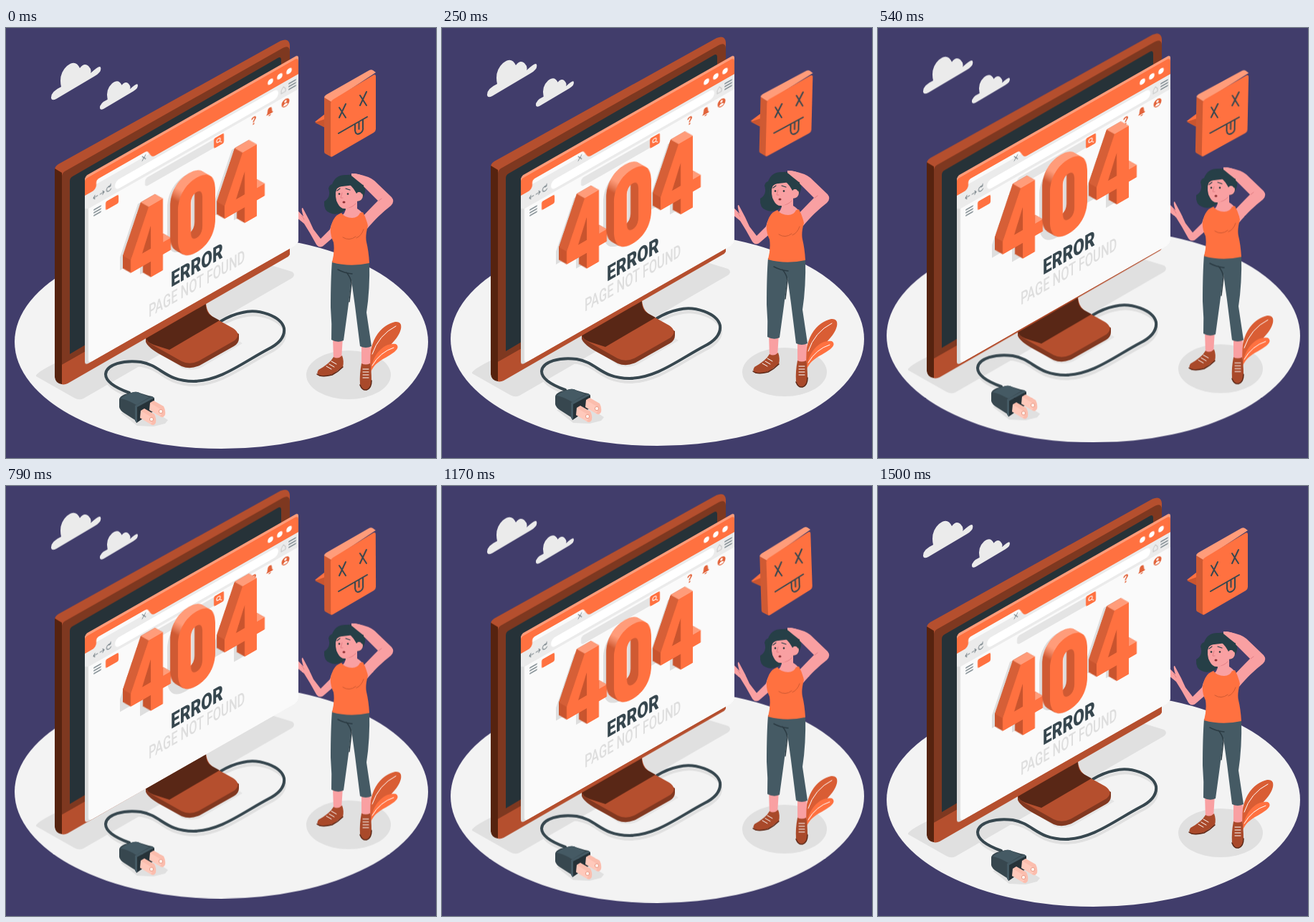
These frames come from a looping animation (600x600 px, 1.54 s). An HTML page:

```html
<!DOCTYPE html>
<html lang="en">
<head>
<meta charset="utf-8">
<title>404 error</title>
<style>
  html, body { margin: 0; width: 100%; height: 100%; overflow: hidden; background: #413d6b; }
  svg { display: block; width: 100vw; height: 100vh; }
  text { font-family: Roboto, Arial, sans-serif; }
  .float { animation: float 1540ms linear infinite; --rise: -12px; }
  .mid { --rise: -24px; }
  .high { --rise: -36px; }
  .sway { animation: sway 1540ms linear infinite; transform-origin: 480px 119px; }
  .line { fill: none; stroke-linecap: round; stroke-linejoin: round; }
  @keyframes float {
    0%, 97.4%, 100% { transform: translateY(0); }
    48.7% { transform: translateY(var(--rise)); }
  }
  @keyframes sway {
    0%, 97.4%, 100% { transform: rotate(0deg); }
    24.35% { transform: rotate(2.2deg); }
    73.05% { transform: rotate(-2.2deg); }
  }
</style>
</head>
<body>
<svg viewBox="0 0 600 600">
  <defs>
    <path id="four" fill-rule="evenodd" d="M0 0V-18L25-78H45V-17H56V0H45V22H28V0ZM28-18V-50L16-18Z"/>
    <path id="zero" fill-rule="evenodd" d="M66-49C66-68 76-80 92-80S118-68 118-49V-7C118 12 108 24 92 24S66 12 66-7ZM84-48V-8C84 0 87 4 92 4S100 0 100-8V-48C100-56 97-60 92-60S84-56 84-48Z"/>
    <g id="fourTops">
      <path fill="#d65f37" d="M0-18L25-78L14-90.6L-11-30.6Z"/>
      <path fill="#ff9c7a" d="M25-78H45L34-90.6H14ZM45-17H56L45-29.6V-17Z"/>
    </g>
    <path id="cloud" d="M63 98Q62 89 77 82Q73 64 85 53Q97 43 103 56Q109 48 115 53Q120 58 118 63Q131 51 132 55Q134 61 124 67L70 99Q64 102 63 98Z"/>
    <path id="cable" d="M172 509Q139 497 139 483C140 469 165 463 188 466C217 471 222 493 262 493C300 492 330 467 366 448Q390 436 388 419C384 402 352 391 330 397Q315 400 300 409"/>
    <linearGradient id="rim" gradientUnits="userSpaceOnUse" x1="0" y1="-82" x2="0" y2="-52">
      <stop offset=".35" stop-color="#ff9c7a"/>
      <stop offset=".75" stop-color="#cf5a33"/>
    </linearGradient>
  </defs>
  <rect width="600" height="600" fill="#413d6b"/>

  <g class="float">
    <g fill="#ebebeb">
      <use href="#cloud"/>
      <use href="#cloud" transform="translate(82.8 37) scale(.765)"/>
    </g>
    <ellipse cx="300.5" cy="438" rx="288.5" ry="149" fill="#f3f3f3"/>
    <path fill="#e0e0e0" d="M42 486Q40 483 60 472L350 325L399 340Q405 344 399 349L108 517Q102 520 95 516Z"/>

    <!-- cable and plug -->
    <path fill="#e0e0e0" d="M160 537L183 555L206 556L222 552L226 547L200 530Z"/>
    <use href="#cable" class="line" stroke="#e0e0e0" stroke-width="4" transform="translate(1 5)"/>
    <use href="#cable" class="line" stroke="#37474f" stroke-width="4"/>
    <path fill="#37474f" d="M158 519Q158 514 166 511L178 508Q182 507 186 509L199 513L204 514L207 517V533L182 551L180 547L166 538Q159 534 158 529Z"/>
    <path fill="#455a64" d="M160 517Q167 511 179 508Q184 507 188 510L200 515L182 526Q168 518 160 517Z"/>
    <path fill="#263238" d="M182 528L207 516V534L182 551Z"/>
    <path fill="#455a64" d="M180 527L204 514L207 516L183 529V551L180 548Z"/>
    <g id="prong">
      <path fill="#ffc9bb" d="M188 534L193 531L207 539Q210 544 209 551Q206 556 202 553L187 544Z"/>
      <path fill="#f3a794" d="M188 534L203 543Q206 548 202 553L206 554Q210 552 209 545L207 539L193 531Z" opacity=".35"/>
      <circle cx="203" cy="546" r="2.7" fill="#fff1ec" stroke="#eb9f8b"/>
    </g>
    <use href="#prong" transform="translate(13 -11)"/>

    <!-- stand -->
    <path fill="#e0e0e0" d="M192 437L246 475Q258 479 272 474L330 440L300 420Z" opacity=".7"/>
    <path fill="#823820" d="M195 431V438Q198 446 216 456L245 472Q257 477 270 471L318 444Q325 440 325 433V427L300 412L260 405Z"/>
    <path fill="#b54f2e" d="M195 432Q196 426 205 421L279 378Q278 397 290 404L317 419Q329 427 319 436L270 464Q257 471 245 465L206 443Q196 438 195 432Z"/>
    <path fill="#592716" d="M195 432Q196 426 205 421L279 378Q277 397 287 402L298 408L228 449L206 442Q196 438 195 432Z"/>

    <!-- monitor -->
    <path fill="#b54f2e" d="M68 198Q68 193 73 190L383 18Q395 13 396 24V314Q396 318 392 320L86 496Q78 500 72 493L68 487Z"/>
    <path fill="#56230f" d="M68 196L78 202V497Q69 496 68 487Z"/>
    <path fill="#7e3820" d="M78 207Q78 203 82 200L386 28Q396 23 396 33V290L78 470Z"/>
    <path fill="#263238" d="M89 214Q89 209 93 207L379 42Q384 39 384 45V280L89 455Z"/>
    <path fill="#b54f2e" d="M78 470L396 289V316L82 497L78 497Z"/>

    <!-- plant -->
    <ellipse cx="478" cy="484" rx="59" ry="34" fill="#e0e0e0"/>
    <path fill="#d95d34" d="M509 478C503 447 517 416 543 410Q553 409 551 420C546 440 522 450 509 478Z"/>
    <path fill="#ff7140" d="M509 480C510 456 528 438 544 441Q550 445 542 452C529 462 516 464 509 480Z"/>
    <path class="line" stroke="#fff" stroke-width="1" d="M511 455Q520 428 544 416M511 471Q522 452 541 446"/>

    <!-- woman: legs -->
    <path fill="#f9a0a2" d="M456 430H470L468 463L457 464ZM496 440H509L508 474H496Z"/>
    <g fill="#a9492a">
      <path d="M457 459Q452 468 436 477Q432 483 438 486Q454 487 463 478L470 473Q472 465 469 457Q463 463 457 459Z"/>
      <path d="M496 468Q493 484 494 497Q496 505 502 505Q510 504 510 491Q510 478 508 468Q502 471 496 468Z"/>
    </g>
    <path class="line" stroke="#5b2716" stroke-width="1.5" d="M434 483Q440 488 455 484Q463 480 470 473M494 498Q497 506 503 505Q510 503 510 492"/>
    <path class="line" stroke="#fff" stroke-width="1" d="M454 465L461 469M451 469L458 473M447 472L454 476M498 476H506M498 480H506M498 484H506M498 488H506"/>
    <path fill="#455a64" d="M455 325H507Q508 365 503 397L510 444Q502 448 494 444L487 388L482 352L477 392L471 436Q463 440 454 435Q455 413 453 390Q453 350 455 325Z"/>
    <path class="line" stroke="#2b3b43" stroke-width="1.5" d="M463 337Q472 342 483 343M475 341Q481 348 482 356L479 382"/>

    <!-- woman: arms and body -->
    <path fill="#263f47" d="M455 218Q460 204 476 205Q492 203 499 217Q505 228 495 241Q485 243 480 248Q465 264 452 258Q443 255 444 242Q454 236 450 224Q451 219 455 218Z"/>
    <path fill="#f9a0a2" d="M482 206Q483 202 491 204Q507 207 514 213L538 236Q543 242 537 248Q520 261 504 280L493 268Q508 252 519 241L501 223Q489 213 482 206Z"/>
    <path fill="#f9a0a2" d="M468 260Q456 264 452 281L439 294L429 281L423 268L414 251Q411 250 415 263Q406 253 401 250Q400 257 405 264L416 273L424 286L433 302Q438 309 445 302L466 284Z"/>
    <path fill="#f9a0a2" d="M474 244L490 240V252Q497 256 499 262L485 271L465 265Q475 258 474 250Z"/>
    <path fill="#ff7140" d="M464 260Q456 264 453 279Q452 289 457 299Q459 311 455 327Q480 334 507 328Q506 311 503 299Q501 290 505 276Q503 266 498 257L494 258Q491 265 483 265Q473 265 468 258Z"/>
    <path class="line" stroke="#cf5a33" stroke-width="1" d="M470 292Q479 298 488 291M499 281Q496 290 489 293"/>
    <path class="line" stroke="#e27f84" stroke-width="1" d="M475 251Q483 251 488 245M412 262Q415 264 416 267M520 241L524 238"/>

    <!-- woman: head -->
    <path fill="#f9a0a2" d="M461 222Q458 237 463 245Q467 253 474 252Q483 250 489 242Q498 241 498 234Q497 227 490 229L486 219Z"/>
    <path fill="#263f47" d="M456 226Q455 213 468 207Q486 203 496 214Q503 224 497 232Q493 226 489 231Q484 222 480 219Q468 219 462 224Q459 228 460 237Q453 236 456 226Z"/>
    <path fill="#f9a0a2" d="M482 203Q494 203 501 208L506 216L498 219Q489 212 482 206Z"/>
    <path class="line" stroke="#263f47" stroke-width="1.2" d="M462 227L466 224M474 224L480 226"/>
    <path class="line" stroke="#e27f84" stroke-width="1" d="M469 230L467 237H470"/>
    <g fill="#263238">
      <circle cx="465" cy="231.500" r="1.300"/><circle cx="477" cy="231.500" r="1.300"/>
      <ellipse cx="471.500" cy="243" rx="2" ry="1.600" fill="#8d3135"/>
    </g>
  </g>

  <!-- speech bubble -->
  <g class="sway">
    <path fill="#ff7140" d="M431 131L445 120L455 139Z"/>
    <path fill="#c9552f" d="M431 132L445 127V139Z"/>
    <path fill="#cf5a33" d="M444 97L454 102V180L445 175Q444 174 444 172Z"/>
    <path fill="#ff9c7a" d="M444 97Q444 95 447 93L505 60Q509 57 512 59L516 62L454 103Z"/>
    <path fill="#ff7140" d="M453 105Q453 102 456 100L512 66Q516 63 516 68V141Q516 144 513 146L456 179Q453 181 453 177Z"/>
    <path class="line" stroke="#37474f" stroke-width="2" d="M465 111L474 125M474 106L465 125M494 94L503 108M503 89L494 108M464 147L504 124M487 134V143Q488 150 494 147Q499 144 498 138V128M492.500 131V141"/>
  </g>

  <!-- browser window -->
  <g transform="matrix(1 -.57 0 1 110 207)">
    <rect width="298" height="264" rx="5" fill="#dcdcdc"/>
    <rect x="5" y="3" width="293" height="261" rx="5" fill="#fafafa"/>
    <path fill="#ebebeb" d="M0 20H298V48H5L0 45Z"/>
    <path fill="#ff9c7a" d="M0 10V5Q0 0 5 0H293Q298 0 298 5V10Z"/>
    <path fill="#ff7140" d="M0 7Q0 4 4 4H294Q298 5 298 9V27H98Q94 27 92 23L88 16Q87 14 84 14H20Q16 14 16 18V22Q15 27 10 27H0Z"/>
    <g fill="#fff">
      <circle cx="259" cy="15.500" r="3.800"/><circle cx="272" cy="15.500" r="3.800"/><circle cx="285" cy="15.500" r="3.800"/>
      <rect x="42" y="31" width="228" height="13" rx="6"/>
    </g>
    <g class="line" stroke="#707c82" stroke-width="1">
      <path d="M80 18L85 24M85 18L80 24M18 37H12M14 34.500L12 37L14 39.500M21 37H27M25 34.500L27 37L25 39.500M36 34A3.300 3.300 0 1 0 36.500 38M36 31V34H33.500"/>
      <path stroke="#c4c4c4" d="M274 37L277 33L280 37V41H274Z"/>
      <path stroke="#8f999e" stroke-width="1.800" d="M285 33H294M285 37H294M285 41H294M13 54H22M13 58H22M13 62H22"/>
    </g>
    <rect x="29" y="52" width="18" height="12" rx="2" fill="#ff7140"/>
    <rect x="84" y="51" width="98" height="12" rx="4" fill="#e4e4e4"/>
    <rect x="180" y="50" width="14" height="14" rx="2" fill="#ff7140"/>
    <g class="line" stroke="#fff"><circle cx="186.500" cy="56" r="2.600"/><path d="M188.500 58.500L191 61"/></g>
    <g fill="#e2633a">
      <text x="232" y="62" font-size="15" font-weight="700">?</text>
      <path d="M253 60Q255 58 255 55Q255 51 258 51T261 55Q261 58 263 60ZM256 61H260Q258 64 256 61Z"/>
      <circle cx="280" cy="57" r="5.500"/>
    </g>
    <g fill="#fff"><circle cx="280" cy="55" r="1.800"/><path d="M276.500 60Q280 55.500 283.500 60Q280 62.500 276.500 60Z"/></g>
  </g>

  <g class="float mid">
    <g fill="#dedede">
      <text transform="matrix(.66 -.381 0 1 199 404)" font-size="25" font-weight="500">PAGE NOT FOUND</text>
      <text transform="matrix(.77 -.444 0 1 230 362)" font-size="29.500" font-weight="900" fill="#37474f">ERROR</text>
      <g transform="matrix(1 -.577 0 1 159 338)">
        <use href="#four"/><use href="#zero"/><use href="#four" x="131"/>
      </g>
    </g>
  </g>
  <g class="float high">
    <g id="digits" transform="matrix(1 -.577 0 1 174 342)"></g>
  </g>
</svg>
<script>
  const digits = document.getElementById('digits');

  function put(id, x, y, fill) {
    const el = document.createElementNS('http://www.w3.org/2000/svg', 'use');
    el.setAttribute('href', '#' + id);
    el.setAttribute('x', x);
    el.setAttribute('y', y);
    if (fill) el.setAttribute('fill', fill);
    digits.append(el);
  }

  // Stack shifted copies to give each digit its depth.
  function block(id, x, side) {
    const steps = 22;
    for (let i = steps; i > 0; i--) put(id, x - 11 * i / steps, -12.6 * i / steps, side);
    if (id === 'four') put('fourTops', x, 0);
    put(id, x, 0, '#ff7140');
  }

  block('four', 0, '#c9552f');
  block('zero', 0, 'url(#rim)');
  block('four', 131, '#c9552f');
</script>
</body>
</html>
```
